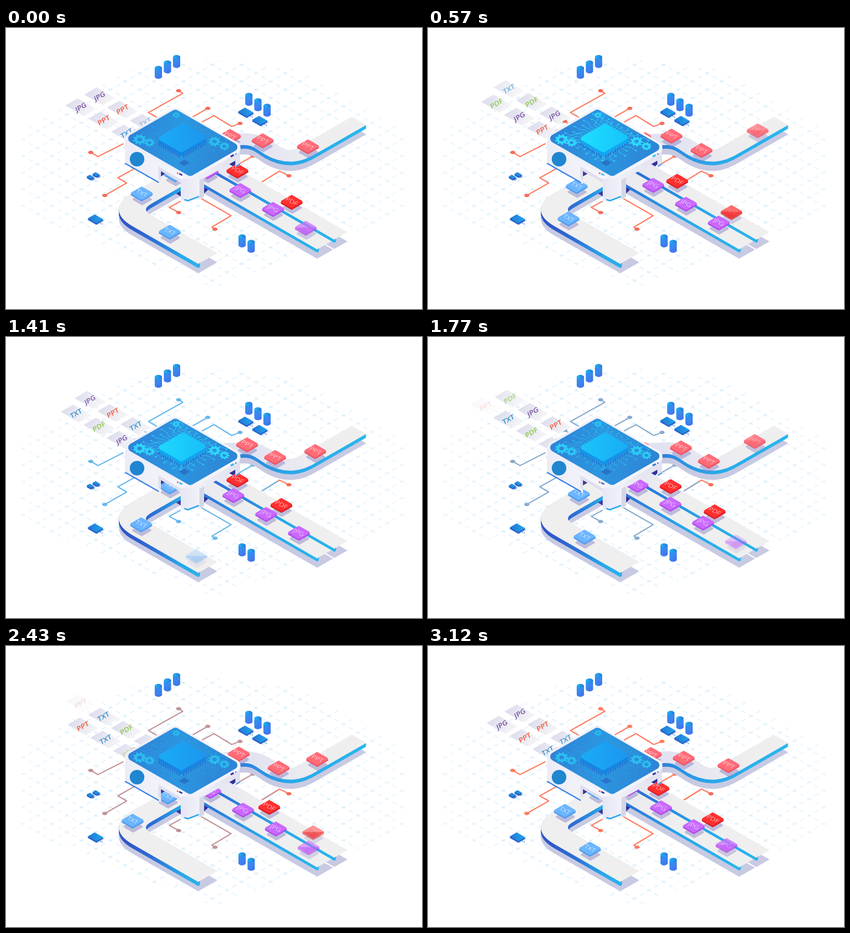
An HTML page with a canvas that plays this animation: 800x542 px, repeating every 3150 ms.

```html
<!DOCTYPE html>
<html lang="en">
<head>
<meta charset="utf-8">
<title>File conversion machine</title>
<style>
html, body { margin: 0; height: 100%; overflow: hidden; background: #fff }
canvas { display: block }
</style>
</head>
<body>
<canvas id="stage" width="800" height="542"></canvas>
<script>
const c = document.getElementById('stage').getContext('2d');
const LOOP = 3150, ISO = .577;
const clamp = v => Math.max(0, Math.min(1, v));
const mod = (a, n) => ((a % n) + n) % n;
const mix = (a, b, k) => `rgb(${a.map((v, i) => Math.round(v + (b[i] - v) * k))})`;

// ---- drawing helpers ----
function poly(pts, fill, r = 0) {
  const n = pts.length, [ax, ay] = pts[0], [bx, by] = pts[n - 1];
  c.beginPath();
  c.moveTo((ax + bx) / 2, (ay + by) / 2);
  pts.forEach((p, i) => c.arcTo(...p, ...pts[(i + 1) % n], r));
  c.closePath();
  c.fillStyle = fill;
  c.fill();
}
// isometric plate: half sizes a (down-right) and b (up-right); corners left, top, right, bottom
function corners(x, y, a, b) {
  const w = (a + b) * .866, h = (a + b) / 2, dx = (b - a) * .866, dy = (b - a) / 2;
  return [[x - w, y + dy], [x + dx, y - h], [x + w, y - dy], [x - dx, y + h]];
}
const plate = (x, y, a, b, fill, r) => poly(corners(x, y, a, b), fill, r);
function slab(x, y, a, b, depth, side, top, r) {
  for (let i = depth; i > 0; i--) plate(x, y + i, a, b, side, r);
  plate(x, y, a, b, top, r);
}
function ellipse(x, y, rx, ry, fill) {
  c.beginPath();
  c.ellipse(x, y, rx, ry, 0, 0, 7);
  c.fillStyle = fill;
  c.fill();
}
function line(pts, colour, w) {
  c.beginPath();
  pts.forEach(p => c.lineTo(...p));
  c.strokeStyle = colour;
  c.lineWidth = w;
  c.stroke();
}
function ramp(x0, y0, x1, y1, ...cols) {
  const g = c.createLinearGradient(x0, y0, x1, y1);
  cols.forEach((v, i) => g.addColorStop(i / (cols.length - 1), v));
  return g;
}
function label(text, x, y, m, font, fill) {
  c.save();
  c.transform(...m, x, y);
  c.font = font;
  c.fillStyle = fill;
  c.textAlign = 'center';
  c.textBaseline = 'middle';
  c.fillText(text, 0, 1);
  c.restore();
}
function track(d) {
  const el = document.createElementNS('http://www.w3.org/2000/svg', 'path');
  el.setAttribute('d', d);
  const len = el.getTotalLength();
  return { len, path: new Path2D(d), at: s => el.getPointAtLength(s) };
}

// ---- floor ----
function grid() {
  c.save();
  c.beginPath();
  [[400, 62], [560, 80], [772, 200], [772, 352], [400, 503], [22, 352], [22, 200], [240, 80]].forEach(p => c.lineTo(...p));
  c.clip();
  const g = c.createRadialGradient(400, 285, 260, 400, 285, 400);
  g.addColorStop(0, '#c3e5fb');
  g.addColorStop(1, '#def1fd');
  c.setLineDash([9, 7.125]);
  c.lineDashOffset = 4.5;
  for (let k = -20; k < 34; k++) for (const s of [-1, 1]) {
    const y = 71 + 32 * k;
    line([[-51, y - s * 256], [845, y + s * 256]], g, 1);
  }
  c.restore();
}

// ---- wires: order in which the wave starts, part it covers, path from machine to dot ----
const wires = [
  [0, 1, 'M296 176 274 163 340 126 332 121'],
  [0, 1, 'M358 172 388 155'],
  [0, 1, 'M374 183 400 169 434 190 450 184'],
  [0, 1, 'M336 334 314 346 332 356'],
  [1, 1, 'M258 265 215 289 232 299 190 323'],
  [1, 1, 'M372 327 433 362 396 384 402 388'],
  [1, 1, 'M290 196 263 180'],
  [1, 1, 'M249 196 231 206'],
  [2, 1, 'M226 223 177 248 163 240'],
  [2, 1, 'M450 261 475 247'],
  [3, .6, 'M492 297 526 276 544 285']
].map(([order, reach, d]) => ({ order, reach, ...track(d) }));
const CORAL = [255, 124, 98], BLUE = [105, 184, 235];

function drawWires(t) {
  const wave = mix(BLUE, CORAL, clamp((t - 1410) / 1710));
  const base = mix(CORAL, CORAL, 0);
  c.lineWidth = 2.4;
  for (const { order, reach, len, path, at } of wires) {
    const k = clamp((t - 600 - order * 135) / 260) * reach, dot = at(len);
    if (k < 1) {
      c.strokeStyle = base;
      c.stroke(path);
    }
    if (k > 0) {
      c.setLineDash([len * k, 999]);
      c.strokeStyle = wave;
      c.stroke(path);
      c.setLineDash([]);
    }
    ellipse(dot.x, dot.y, 5, 3.2, k < 1 ? '#f46e5b' : wave);
  }
}

// ---- small scenery ----
function cylinder(x, y) {
  const g = ramp(x - 7, y, x + 7, y + 20, '#2795ee', '#3b86f0', '#4170ea');
  c.fillStyle = g;
  c.fillRect(x - 7, y, 14, 17);
  ellipse(x, y + 17, 7, 4, g);
  ellipse(x, y, 7, 4, ramp(x - 7, y, x + 7, y, '#1fb6f2', '#2b78dd'));
}
function smallChip(x, y, size) {
  for (let i = 0; i < 5; i++) {
    const k = size * (i / 2.5 - .8), px = x + .866 * (size + k), py = y + .5 * (size - k);
    line([[px, py], [px + 3, py + 4]], '#2b6fc4', 1);
    line([[2 * x - px + size * 1.7, py + size * .1], [2 * x - px + size * 1.7, py + size * .1 + 3]], '#2b6fc4', 0);
  }
  slab(x, y, size * 1.1, size * .9, 3, '#2b62c9', ramp(x - 14, y, x + 14, y, '#2277d5', '#22a3ec'));
}
function row(n, x, y, dx, dy, draw) {
  for (let i = 0; i < n; i++) draw(x + i * dx, y + i * dy);
}
function scenery() {
  row(3, 293, 77, 17.5, -10.5, cylinder);
  row(3, 467, 129, 17.5, 10.5, cylinder);
  row(2, 454, 402, 17.5, 10.5, cylinder);
  row(2, 461, 162, 27, 16, (x, y) => smallChip(x, y, 8.5));
  row(2, 162, 287, 11, -5, (x, y) => smallChip(x, y, 4));
  smallChip(172, 368, 8.5);
}

// ---- incoming papers ----
const kinds = ['TXT', 'PPT', 'JPG', 'PDF'];
const inks = { TXT: '#2f8fd2', PPT: '#f2583e', JPG: '#7650a0', PDF: '#8fc94a' };
function papers(t, x0, y0, start, slots) {
  for (let i = -1; i < 12; i++) {
    const d = (slots * t / LOOP - i) * 44, x = x0 + d, y = y0 + d * .575;
    if (x < start || x > 312) continue;
    const kind = kinds[mod(i, 4)];
    c.globalAlpha = clamp((x - start) / 26);
    plate(x, y, 20.5, 13.7, ramp(x - 18, y - 10, x + 17, y + 10, '#dfdfee', '#f3f3f6'));
    c.globalAlpha *= clamp((start + 134 - x) / 8);
    label(kind, x, y, [.87, -.5, .35, .85], '600 14px "Open Sans", sans-serif', inks[kind]);
  }
  c.globalAlpha = 1;
}

// ---- conveyor lanes: strokes on the ground plane, extruded downwards ----
const flat = new DOMMatrix([1, 0, 0, 1 / ISO, 0, 0]);
function lane(d, width, depth) {
  const tr = track(d), ground = new Path2D();
  ground.addPath(tr.path, flat);
  const from = tr.at(0), to = tr.at(tr.len);
  const heading = Math.sign(to.y - tr.at(tr.len - 5).y);
  const nearCorner = to.x - heading * width * .354 + 3;
  const stroke = (dy, style) => {
    c.save();
    c.translate(0, dy);
    c.scale(1, ISO);
    c.lineWidth = width;
    c.strokeStyle = style;
    c.stroke(ground);
    c.restore();
  };
  return {
    ...tr,
    shadow() { stroke(18, '#c8cae3'); },
    body() {
      const side = ramp(from.x - 115, 0, to.x, 0, '#2f57c9', '#2c70d6', '#29a8ea', '#29b6ec');
      c.save();
      c.beginPath();
      c.rect(0, 0, nearCorner, 542); // the end of a lane is open
      c.clip();
      for (let i = depth; i > 0; i--) stroke(i, side);
      c.restore();
      stroke(0, ramp(from.x, from.y, to.x, to.y, '#dfe0f1', '#e6e6f1', '#eeeeef', '#efefef'));
    }
  };
}
const pptLane = lane('M390,217 L448,215 C482,211 497,227 512,236 C540,252 560,249 585,233 L679,179', 39, 7);
const txtLane = lane('M348,278.5 L262,328 Q224,350 262,372 L388,444.5', 52, 8);
const lanes = [pptLane, txtLane, lane('M362,273 L613.5,418.3', 43, 6), lane('M410,266 L644,401', 36, 6)];

// ---- converted files ----
const tones = {
  TXT: ['#6bb5ff', '#4f9df0'], PPT: ['#ff6c78', '#ee5564'],
  JPG: ['#ca69fd', '#b14deb'], PDF: ['#ff2f2f', '#dd1f26']
};
function chip(kind, x, y, alpha) {
  if (alpha <= 0) return;
  const [top, side] = tones[kind];
  c.globalAlpha = alpha;
  plate(x + 1, y + 12, 11.8, 11.8, 'rgba(128,122,190,.45)', 2);
  poly([[x - 21, y], [x + 21, y], [x + 21, y + 4], [x, y + 16], [x - 21, y + 4]], side, 2);
  plate(x, y, 13, 13, top, 2);
  c.globalAlpha = alpha ** 3;
  label(kind, x, y, [.87, .45, -.42, .65], '300 14px "Open Sans", Lato, sans-serif', '#fff');
  c.globalAlpha = 1;
}
// calls back with the age of every chip, also those about to appear
function each(births, t, draw) {
  for (const born of births) {
    const age = mod(t - born, LOOP);
    draw(age);
    draw(age - LOOP);
  }
}
// steady ride along a lane that gets faster after `turn`
function ride(tr, start, speed, boost, turn, lift, age) {
  const s = start + speed * age + boost * Math.max(0, age - turn);
  if (s < 0 || s > tr.len) return null;
  const p = tr.at(s);
  return [p.x, p.y - lift, s];
}
function chips(t) {
  c.save();
  c.beginPath();
  c.rect(416, 0, 400, 542);
  c.clip();
  each([870, -40, 2130], t, age => {
    const p = ride(pptLane, 38, .066, .042, 2000, 8, age);
    if (p) chip('PPT', p[0], p[1], clamp((673 - p[0]) / 52));
  });
  c.restore();
  each([150, 1410, 2370], t, age => {
    const p = ride(txtLane, 38, .08, .052, 900, 10, age);
    if (p) chip('TXT', p[0], p[1], clamp((288 - p[2]) / 33));
  });
  each([0, 1410], t, age => {
    const x = 445 + age * .06;
    if (x > 395) chip('PDF', x, 274.5 + (x - 445) * ISO, clamp((608 - x) / 34));
  });
  for (let i = -1; i < 4; i++) {
    const x = 387.5 + mod(t * 4 / LOOP, 1) * 63 + i * 63;
    if (x > 370) chip('JPG', x, 312 + (x - 450.5) * ISO, clamp((605 - x) / 40));
  }
}

// ---- machine ----
function interior() {
  poly([[298, 270], [338, 292], [338, 326], [298, 302]], '#393a9b');
  poly([[380, 288], [441, 254], [441, 263], [380, 320]], '#30329a');
}
function gear(x, y, r, fill) {
  c.beginPath();
  for (let i = 0; i < 36; i++) {
    const a = i / 36 * 2 * Math.PI, q = i % 4 < 2 ? r : r * .74;
    c.lineTo(x + q * Math.cos(a), y + q * .8 * Math.sin(a));
  }
  c.closePath();
  c.ellipse(x, y, r * .36, r * .29, 0, 0, 2 * Math.PI);
  c.fillStyle = fill;
  c.fill('evenodd');
}
// traces leave the edge a-b along (dx, dy), bend outwards and end in a dot
function traces(a, b, dx, dy, reach, colour) {
  const ex = b[0] - a[0], ey = b[1] - a[1];
  for (let i = 0; i < 9; i++) {
    const k = (i + .5) / 9, spread = (k - .5) * .7, out = reach * (.55 + .45 * (i * 5 % 9) / 8);
    const at = (d, s) => [a[0] + ex * (k + spread * s) + dx * d, a[1] + ey * (k + spread * s) + dy * d];
    line([at(0, 0), at(out * .35, 0), at(out * .6, 1), at(out, 1)], colour, 1);
    ellipse(...at(out, 1), 1.7, 1.3, colour);
  }
}
function walls() {
  poly([[346, 282], [450, 226], [450, 264], [441, 269], [441, 256], [381, 290], [381, 327], [372, 331], [346, 334]],
    ramp(345, 0, 450, 0, '#f3f3fa', '#e1e1ef'));
  poly([[229, 208], [350, 280], [350, 300], [337, 299], [298, 276], [298, 301], [229, 262]],
    ramp(229, 0, 350, 0, '#ebecf6', '#f7f7fc'));
  poly([[293, 267], [343, 296], [337, 299], [298, 276], [298, 294], [293, 291]], '#dfdfee');
  poly([[336, 290], [372, 290], [372, 328], [350, 336], [336, 331]], ramp(336, 0, 372, 0, '#e6e7f3', '#f1f1f9'), 5);
  poly([[372, 293], [381, 288], [381, 325], [372, 330]], '#d6d7e5');
  line([[229, 261], [294, 298]], '#3a7fe6', 2.5);
  line([[343, 331], [350, 333], [371, 325]], '#27a7ec', 2.5);
  line([[442, 267], [450, 262]], '#3a7fe6', 2);
  ellipse(252, 253, 14, 14, '#1f86cf');
}
function machine(t) {
  const glow = clamp(t / 500) * clamp((2200 - t) / 900);
  const shade = (dim, bright) => mix(dim, bright, glow);
  walls();
  plate(340, 222.5, 79.5, 62.5, ramp(230, 0, 450, 0, '#ecedf7', '#f5f5fb'), 12);
  c.save();
  plate(340, 221.5, 73.5, 57, ramp(240, 200, 430, 240, '#2f83d8', '#2c96e0', '#2d86d6'), 8);
  c.clip();

  const [L, T, R, B] = corners(339, 212, 27.5, 29.5), wire = shade([38, 158, 226], [40, 214, 252]);
  traces(L, T, -.866, -.5, 31, wire);
  traces(T, R, .866, -.5, 14, wire);
  traces(B, R, .866, .5, 34, wire);
  traces(L, B, -.866, .5, 22, wire);
  const teeth = shade([42, 190, 240], [45, 220, 255]);
  gear(257, 215, 13, teeth);
  gear(276, 221, 10, teeth);
  gear(401, 219, 12, teeth);
  gear(420, 228, 10, teeth);
  gear(327, 168, 7, teeth);
  plate(343, 260, 6, 6, '#2a72c8');

  for (let i = 0; i < 10; i++) {
    for (const end of [L, R]) {
      const k = .1 + i * .09, x = end[0] + (B[0] - end[0]) * k, y = end[1] + (B[1] - end[1]) * k;
      line([[x, y + 5], [x, y + 12]], '#2763c6', 1.6);
    }
  }
  slab(339, 212, 27.5, 29.5, 7, shade([24, 132, 226], [20, 166, 240]),
    ramp(292, 0, 385, 0, shade([26, 172, 246], [30, 222, 255]), shade([28, 150, 240], [22, 196, 250])), 4);
  c.restore();

  const lamp = shade([48, 52, 170], [40, 200, 250]);
  line([[432, 248], [438, 245]], lamp, 3.5);
  ellipse(442, 243, 1.5, 1.5, '#3f7fe6');
  ellipse(330, 280, 1.6, 1.6, '#ff4a4a');
  line([[333, 281], [339, 284]], lamp, 3);
}

function draw(t) {
  c.fillStyle = '#fff';
  c.fillRect(0, 0, 800, 542);
  c.lineJoin = 'round';
  grid();
  drawWires(t);
  scenery();
  papers(t, 268, 182.5, 138, 8);
  papers(t, 232, 203.5, 106, 4);
  lanes.forEach(l => l.shadow());
  interior();
  lanes.forEach(l => l.body());
  chips(t);
  machine(t);
}

const begin = performance.now();
function tick() {
  const t = (performance.now() - begin) % LOOP;
  draw(Math.floor(t / 30) * 30);
  requestAnimationFrame(tick);
}
tick();
</script>
</body>
</html>
```
